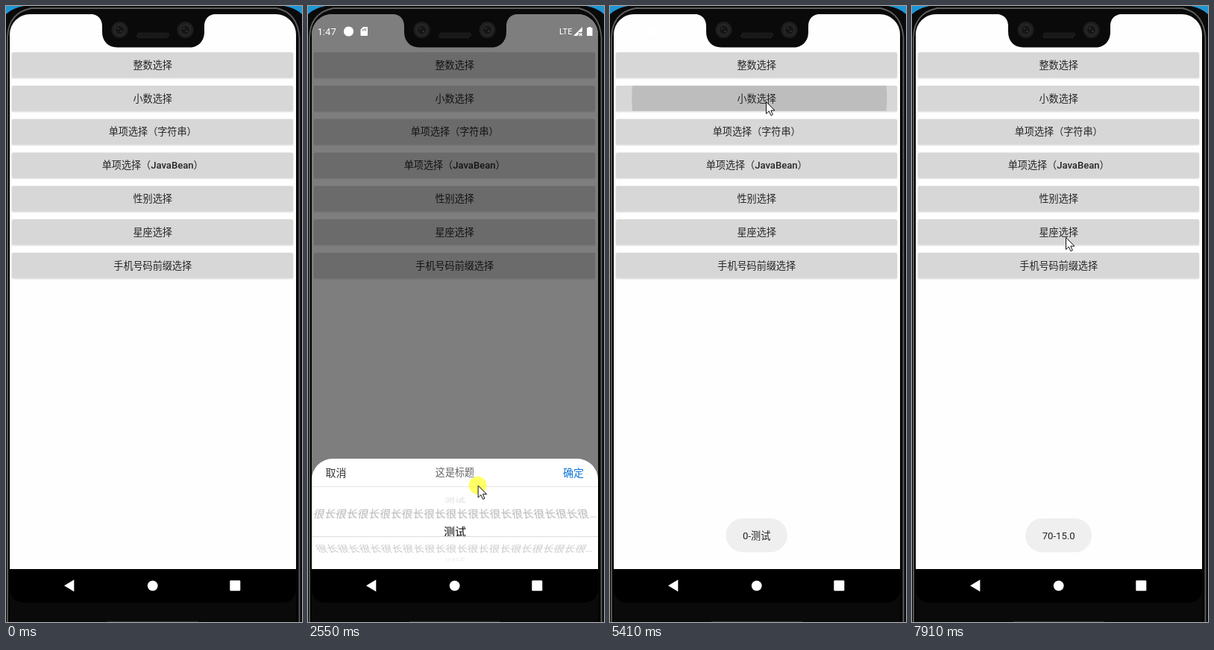
These frames come from a looping animation (397 px wide and 826 px high, 7990 ms). An HTML page:

```html
<!DOCTYPE html>
<html lang="zh-CN">
<head>
<meta charset="utf-8">
<title>Picker demo</title>
<style>
html, body { margin: 0; width: 100%; height: 100%; overflow: hidden; background: #0a0a0a; }
body, text { font-family: Roboto, "Noto Sans CJK SC", "Noto Sans CJK", sans-serif; }
#stage { position: absolute; left: 0; top: 0; width: 397px; height: 826px; overflow: hidden; }
#stage > svg { position: absolute; left: 0; top: 0; }
#dim { position: absolute; left: 5px; top: 11px; width: 384px; height: 744px; border-radius: 27px 27px 0 0; background: #000; }
.sheet { position: absolute; left: 5px; width: 384px; background: #fff; }
.head { position: relative; height: 37px; border-bottom: 1px solid #e6e6e6; line-height: 38px; font-size: 14px; color: #333; }
.head span { position: absolute; }
.head .no { left: 18.5px; }
.head .title { left: 0; width: 100%; text-align: center; font-size: 13.1px; color: #666; }
.head .yes { right: 19px; color: #0d74d6; }
.wheel { position: absolute; overflow: hidden; }
.band { position: absolute; left: 0; width: 100%; overflow: hidden; background: #fff; }
.item { position: absolute; left: 0; width: 100%; height: 20px; line-height: 20px; text-align: center; white-space: nowrap; font-size: 14.95px; color: #888; }
.band .item { color: #000; }
.line { position: absolute; left: 0; width: 100%; height: 1px; background: #ddd; }
.unit { position: absolute; left: 226.5px; top: 115px; font-size: 12px; line-height: 20px; color: #777; }
</style>
</head>
<body>
<div id="stage">
  <svg width="397" height="826" viewBox="0 0 397 826">
    <rect width="397" height="826" fill="#1f96d4"/>
    <path d="M0 11Q8 3 24 0H373Q389 3 397 11V826H0Z" fill="#0a0a0a"/>
    <g fill="none">
      <path d="M2 826V42Q3 9 34 3H363Q391 9 393.500 42V826" stroke="#5e5e5e" stroke-width="1.8"/>
      <path d="M4.200 826V40M390.500 826V40" stroke="#000" stroke-width="1.5"/>
    </g>
    <path d="M5 755V38A27 27 0 0 1 32 11H362A27 27 0 0 1 389 38V755Z" fill="#fefefe"/>
    <g id="buttons"></g>
    <clipPath id="btnClip"><rect id="btnBox" x="8" width="377" height="34" rx="2"/></clipPath>
    <g clip-path="url(#btnClip)"><circle id="ripple" fill="#000" fill-opacity=".12"/></g>
    <g id="labels" font-size="13.1" text-anchor="middle" fill="#262626"></g>
  </svg>

  <div id="dim"></div>

  <div class="sheet" id="textSheet" style="top:607px;height:148px;border-radius:28px 28px 0 0">
    <div class="head"><span class="no">取消</span><span class="title">这是标题</span><span class="yes">确定</span></div>
    <div class="wheel" id="textWheel" style="left:0;top:38px;width:384px;height:110px"></div>
  </div>

  <div class="sheet" id="tempSheet" style="top:544px;height:211px">
    <div class="head"><span class="no">取消</span><span class="title">温度选择</span><span class="yes">确定</span></div>
    <div class="wheel" id="tempWheel" style="left:145px;top:38px;width:82px;height:173px"></div>
    <span class="unit">℃</span>
  </div>

  <svg width="397" height="826" viewBox="0 0 397 826">
    <path d="M112 10.500C124 11 129 18 129 27V35C129 47 137 55.500 149 55.500H246C258 55.500 266 47 266 35V27C266 18 271 11 283 10.500Z" fill="#0a0a0a"/>
    <g id="cams"></g>
    <g stroke="#444" stroke-width="1" stroke-dasharray="1 1">
      <path d="M177 36.500H218M176 38.500H219M175 40.500H218M177 42.500H217"/>
    </g>
    <g fill="#fff">
      <text x="12.500" y="38.600" font-size="13.1">1:47</text>
      <circle cx="54.500" cy="34" r="6.600"/>
      <path fill-rule="evenodd" d="M74 28H79Q80 28 80 29V39Q80 40 79 40H71.500Q70.500 40 70.500 39V31.500ZM73 31V33.500H74V31ZM75 30V33.500H76V30ZM77 30V33.500H78V30Z"/>
      <text x="337" y="38" font-size="11.2">LTE</text>
      <path fill-rule="evenodd" d="M368 28V34L365.500 35.500L362.500 34.500L363 37L361.500 40H356ZM364 36L365.500 37.200L367 36L368 37L366.700 38.300L368 39.500L367 40.500L365.500 39L364 40.500L363 39.500L364.300 38.300L363 37Z"/>
      <path d="M376 28H379.500V29.200H381.500V40H374V29.200H376Z"/>
    </g>
    <path d="M5 755H389V780Q389 800 369 800H25Q5 800 5 780Z" fill="#000"/>
    <path d="M136 825.500H258" stroke="#2a2a2a" stroke-width="1.5"/>
    <g fill="#fff">
      <path d="M78 777.300L91.300 769.300V785.300Z"/>
      <circle cx="196.700" cy="777.300" r="6.900"/>
      <rect x="300.300" y="770.300" width="14" height="14" rx="1.300"/>
    </g>
    <g id="toast">
      <rect id="toastBox" y="687" height="45.500" rx="22.700" fill="#efefef"/>
      <text id="toastText" x="196.700" y="714.500" font-size="13.1" text-anchor="middle" fill="#222"></text>
    </g>
    <g id="cursor">
      <circle id="press" r="12" fill="#ff0" fill-opacity=".6"/>
      <path d="M.500 .500V16.500L4.300 12.900L6.900 18.700L9.300 17.600L6.800 12H12Z" fill="#fff" stroke="#111" stroke-width="1"/>
    </g>
  </svg>
</div>

<script>
const LOOP = 7990;
const $ = id => document.getElementById(id);
const clamp = u => Math.max(0, Math.min(1, u));
const ramp = (t, a, b) => clamp((t - a) / (b - a));
const smooth = u => u * u * (3 - 2 * u);
const during = (t, a, b) => t >= a && t < b;
const set = (el, attrs) => { for (const k in attrs) el.setAttribute(k, attrs[k]); };

function addSvg(parent, tag, attrs, text = "") {
  const el = document.createElementNS("http://www.w3.org/2000/svg", tag);
  set(el, attrs);
  el.textContent = text;
  parent.append(el);
  return el;
}

function addDiv(parent, cls, style) {
  const el = document.createElement("div");
  el.className = cls;
  Object.assign(el.style, style);
  parent.append(el);
  return el;
}

// Eased value of column col from rows of [time, value, ...]
function track(keys, t, col = 1) {
  const i = keys.findIndex(k => k[0] > t);
  if (i === 0) return keys[0][col];
  if (i < 0) return keys[keys.length - 1][col];
  const a = keys[i - 1], b = keys[i];
  return a[col] + (b[col] - a[col]) * smooth(ramp(t, a[0], b[0]));
}

// Static parts
const names = ["整数选择", "小数选择", "单项选择（字符串）", "单项选择（JavaBean）", "性别选择", "星座选择", "手机号码前缀选择"];
const buttonY = i => 62 + i * 44.8;
names.forEach((name, i) => {
  const y = buttonY(i);
  addSvg($("buttons"), "rect", { x: 7.5, y: y + 0.5, width: 378, height: 35.2, rx: 2.5, fill: "#000", "fill-opacity": 0.1 });
  addSvg($("buttons"), "rect", { x: 8, y, width: 377, height: 34, rx: 2, fill: "#d6d7d6" });
  const label = addSvg($("labels"), "text", { x: 196.7, y: y + 21.8 });
  // Only Latin letters use the medium weight
  for (const part of name.split(/([A-Za-z]+)/).filter(Boolean))
    addSvg(label, "tspan", { "font-weight": /[A-Za-z]/.test(part) ? 500 : 400 }, part);
});
for (const x of [152.5, 240.5]) {
  [[11, "#1e1e1e"], [8, "#262626"], [5.5, "#151515"]].forEach(([r, fill]) =>
    addSvg($("cams"), "circle", { cx: x, cy: 32, r, fill }));
  for (const [dx, dy] of [[-2, -2], [2, 2]])
    addSvg($("cams"), "circle", { cx: x + dx, cy: 32 + dy, r: 1.1, fill: "#3b3b3b" });
}

// A wheel has faded items, and a band over them showing the same items in black
function makeWheel(el, mid, half, label, place) {
  const top = mid - half;
  const fill = (box, y) => Array.from({ length: 7 }, () => addDiv(box, "item", { top: y - 10 + "px" }));
  const outer = fill(el, mid);
  const band = addDiv(el, "band", { top: top + "px", height: half * 2 + "px" });
  const inner = fill(band, half);
  const upper = addDiv(el, "line", { top: top + "px" });
  addDiv(el, "line", { top: mid + half - 0.5 + "px" });
  return (pos, showUpper) => {
    upper.style.opacity = showUpper ? 1 : 0;
    for (let k = 0; k < 7; k++) {
      const i = Math.round(pos) + k - 3;
      const { transform, alpha } = place(i - pos);
      for (const item of [outer[k], inner[k]]) {
        item.textContent = label(i);
        item.style.transform = transform;
      }
      outer[k].style.opacity = alpha;
      inner[k].style.opacity = alpha > 0 ? 1 : 0;
    }
  };
}

const longText = "很长".repeat(12) + "很…";
const RADIUS = 55;
const drawText = makeWheel($("textWheel"), 54.5, 11.5, i => i % 2 ? longText : "测试", d => {
  const deg = -26 * d;
  return {
    transform: `perspective(260px) translateZ(${-RADIUS}px) rotateX(${deg}deg) translateZ(${RADIUS}px)`,
    alpha: Math.abs(deg) < 88 ? 1 - Math.abs(Math.sin(deg * Math.PI / 180)) : 0
  };
});
const drawTemp = makeWheel($("tempWheel"), 86.5, 17.25, i => (i * 0.5 - 20).toFixed(1), d => ({
  transform: `translateY(${d * 34.5}px)`,
  alpha: clamp(1.03 - Math.abs(d) * 34.5 / 86.5)
}));

// Motion
const path = [
  [70, 341, 751], [840, 198, 180], [990, 199, 163], [1380, 199, 163], [1850, 189, 737],
  [1900, 189, 737], [2020, 192, 775], [2250, 222, 690], [2600, 228, 640], [2800, 229, 628],
  [3100, 229, 676], [3280, 230, 680], [3560, 349, 620], [3640, 350, 612], [3880, 350, 612],
  [4440, 215, 179], [4800, 210, 125], [5100, 209, 128], [5480, 209, 128], [5860, 205, 725],
  [5930, 205, 725], [6150, 215, 640], [6500, 341, 568], [6650, 341, 568], [6820, 347, 572],
  [7220, 347, 572], [7840, 206, 312], [7910, 206, 310]
];
const presses = [[1140, 1270], [2280, 2600], [2800, 3240], [3640, 3750], [5250, 5385], [5930, 6150], [6840, 7050]];
const textPos = [[2280, 0], [2600, 1.9], [2720, 2], [2800, 2], [3100, -0.26], [3300, 0]];
const tempPos = t => t < 6150
  ? 60 + 2.5 * ramp(t, 5930, 6150)
  : 62.5 + 7.5 * (1 - (1 - ramp(t, 6150, 6800)) ** 3);
const ripples = [{ at: 1180, row: 2, x: 199 }, { at: 5290, row: 1, x: 209 }];
const toasts = [
  { text: "0-测试", width: 82.5, from: 3840, to: 6000 },
  { text: "70-15.0", width: 89, from: 7260, to: 9999 }
];
const fade = (t, open, opened, close, closed) => ramp(t, open, opened) * (1 - ramp(t, close, closed));

function drawRipple(t) {
  const r = ripples.find(r => during(t, r.at, r.at + 450));
  $("ripple").setAttribute("opacity", r ? 1 - ramp(t, r.at + 200, r.at + 450) : 0);
  if (!r) return;
  const u = ramp(t, r.at, r.at + 140), y = buttonY(r.row);
  $("btnBox").setAttribute("y", y);
  set($("ripple"), { cx: r.x + (199 - r.x) * u, cy: y + 17, r: 198 * u });
}

function drawToast(t) {
  const n = toasts.find(n => during(t, n.from, n.to));
  $("toast").setAttribute("opacity", n ? fade(t, n.from, n.from + 200, n.to - 160, n.to) : 0);
  if (!n) return;
  set($("toastBox"), { x: 196.6 - n.width / 2, width: n.width });
  $("toastText").textContent = n.text;
}

function drawSheet(el, alpha) {
  el.style.opacity = alpha;
  el.style.visibility = alpha > 0 ? "visible" : "hidden";
}

function draw(t) {
  drawRipple(t);
  drawToast(t);
  $("dim").style.opacity = 0.5 * Math.max(fade(t, 1340, 1540, 3740, 3850), fade(t, 5450, 5650, 7100, 7220));
  drawSheet($("textSheet"), fade(t, 1340, 1560, 3760, 3930));
  drawSheet($("tempSheet"), fade(t, 5450, 5670, 7120, 7300));
  const p = track(textPos, t);
  drawText(p, Math.abs(p - Math.round(p)) < 0.02);
  drawTemp(tempPos(t), false);
  set($("cursor"), {
    transform: `translate(${track(path, t, 1)} ${track(path, t, 2)})`,
    opacity: t < 70 ? 0 : 1
  });
  $("press").setAttribute("opacity", presses.some(([a, b]) => during(t, a, b)) ? 1 : 0);
}

const start = performance.now();
function tick() {
  draw((performance.now() - start) % LOOP);
  requestAnimationFrame(tick);
}
tick();
</script>
</body>
</html>
```
